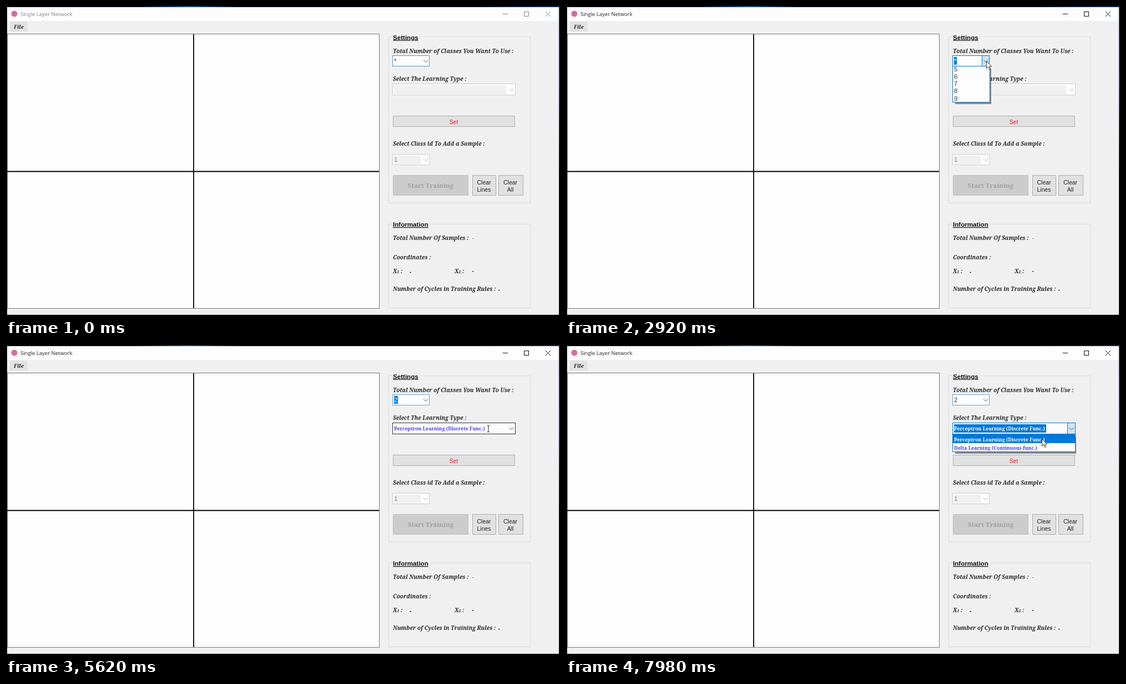
Write an HTML page that moves like this. It is 998 px wide and 561 px high and loops after 8 s.

```html
<!DOCTYPE html>
<html lang="en">
<head>
<meta charset="utf-8">
<title>Single Layer Network</title>
<style>
  html, body { margin: 0; width: 100%; height: 100%; overflow: hidden; background: #f0f0f0; }
  svg { display: block; }
  rect, .crisp { shape-rendering: crispEdges; }
  text { white-space: pre; }
  .label { font: italic bold 10px "Noto Serif", serif; fill: #262626; }
  .heading { font: bold 11.6px "Liberation Sans", sans-serif; fill: #111; text-decoration: underline; }
  .sans { font: 10.4px "Liberation Sans", sans-serif; fill: #222; }
  .value { font: 11.4px "Liberation Sans", sans-serif; fill: #333; }
  .dash { font: bold 10px "Liberation Sans", sans-serif; fill: #222; }
  .choice { font: bold 8.7px "Noto Serif", serif; fill: #463ee0; }
  .mid { text-anchor: middle; }
  .box { fill: #fdfdfd; stroke: #cccccc; }
  .inner { fill: #f0f0f0; }
  .button { fill: #e1e1e1; stroke: #adadad; }
  .group { fill: none; stroke: #dcdcdc; }
  .blue { fill: #0078d7; }
  .list { fill: #fdfdfd; stroke: #0078d7; }
  .shadow { fill: #555; opacity: .65; }
  .chevron { fill: none; stroke: #555; }
  .off { stroke: #b0b0b0; }
  .light { fill: #fff; }
</style>
</head>
<body>
<svg id="stage" width="998" height="561" viewBox="0 0 998 561">
  <defs>
    <linearGradient id="desktop">
      <stop offset=".24" stop-color="#030811"/><stop offset=".33" stop-color="#0c4a94"/>
      <stop offset=".42" stop-color="#030811"/><stop offset=".85" stop-color="#030811"/>
      <stop offset="1" stop-color="#0a2a58"/>
    </linearGradient>
    <linearGradient id="edge" x2="0" y2="1">
      <stop offset="0" stop-color="#0a2a58"/><stop offset=".25" stop-color="#0c3c7c"/>
      <stop offset=".55" stop-color="#050d1c"/>
    </linearGradient>
    <path id="chevron" d="M-4-2L0 2L4-2"/>
  </defs>

  <!-- Window frame -->
  <rect width="998" height="561" fill="#f0f0f0"/>
  <rect y="2" width="996" height="25" fill="#fdfdfd"/>
  <rect width="998" height="2" fill="url(#desktop)"/>
  <rect x="996" width="2" height="561" fill="url(#edge)"/>
  <rect y="557" width="998" height="4" fill="#000"/>
  <rect width="2" height="561" fill="#000"/>
  <circle cx="15" cy="14" r="5.5" fill="#cf6f9f"/>
  <text id="title" x="26" y="18" style="font:9.5px 'Open Sans',sans-serif">Single Layer Network</text>
  <g id="controls" fill="none">
    <path class="crisp" d="M895 14.5H904M933.5 10.5H941.5V18.5H933.5Z"/>
    <path d="M972 10L981 19M981 10L972 19"/>
  </g>
  <rect x="7" y="28" width="32" height="18" fill="#e2e2e2"/>
  <text class="label" x="14" y="40.5" style="font-size:9.6px">File</text>

  <!-- Plot area -->
  <rect x="2.5" y="50.5" width="670" height="495" fill="#fdfdfd" stroke="#777780"/>
  <path d="M338 51V545M2 298.5H672" stroke="#000" stroke-width="1.8"/>

  <!-- Settings -->
  <path class="group crisp" d="M695 55.5H689.5V355.5H944.5V55.5H746"/>
  <text class="heading" x="697" y="60.5">Settings</text>
  <text class="label" x="697" y="84.5">Total Number of Classes You Want To Use :</text>
  <rect id="classBox" class="box" x="696.5" y="89.5" width="66" height="19"/>
  <rect id="classButton" x="749.5" y="89.5" width="13" height="19"/>
  <rect id="classMark" class="blue" x="699" y="92" height="14"/>
  <text id="classValue" class="value" x="699" y="103"></text>
  <use href="#chevron" class="chevron" x="756" y="99.5"/>

  <text class="label" x="697" y="135">Select The Learning Type :</text>
  <rect id="typeBox" class="box" x="696.5" y="140.5" width="221" height="20"/>
  <rect id="typeInner" class="inner" x="699" y="143" width="202" height="16"/>
  <rect id="typeButton" x="903.5" y="140.5" width="14" height="20"/>
  <rect id="typeMark" class="blue" x="699" y="143" width="166" height="15"/>
  <text id="typeValue" class="choice" x="699" y="154">Perceptron Learning (Discrete Func.)</text>
  <use id="typeChevron" href="#chevron" x="910.5" y="151"/>

  <rect class="button" x="697.5" y="198.5" width="219" height="19"/>
  <text class="sans mid" x="806.5" y="212.5" style="fill:#ee1430">Set</text>

  <text class="label" x="697" y="251.5">Select Class id To Add a Sample :</text>
  <rect class="box" x="696.5" y="267.5" width="66" height="19"/>
  <rect class="inner" x="699" y="270" width="48" height="15"/>
  <text class="value" x="699" y="281" style="fill:#858585">1</text>
  <use href="#chevron" class="chevron off" x="756" y="277.5"/>

  <rect x="697.5" y="305.5" width="135" height="36" fill="#cccccc" stroke="#bfbfbf"/>
  <text class="mid" x="765" y="328" style="font:bold 11.6px 'Noto Serif',serif;fill:#a0a0a0">Start Training</text>
  <rect class="button" x="840.5" y="305.5" width="42" height="36"/>
  <rect class="button" x="887.5" y="305.5" width="44" height="36"/>
  <g class="sans mid">
    <text x="861" y="322">Clear</text><text x="861" y="334.5">Lines</text>
    <text x="908.5" y="322">Clear</text><text x="908.5" y="334.5">All</text>
  </g>

  <!-- Information -->
  <path class="group crisp" d="M695 393.5H689.5V544.5H944.5V393.5H762"/>
  <text class="heading" x="697" y="398">Information</text>
  <g class="label">
    <text x="697" y="422">Total Number Of Samples :</text>
    <text x="697" y="456.5">Coordinates :</text>
    <text x="697" y="481.5">X<tspan font-size="7.4">1</tspan> :</text>
    <text x="808" y="481.5">X<tspan font-size="7.4">2</tspan> :</text>
    <text x="697" y="514">Number of Cycles in Training Rules :</text>
  </g>
  <g class="dash">
    <text x="839.5" y="422" style="font-weight:normal;fill:#777">-</text>
    <text x="727" y="482.5">-</text>
    <text x="839.5" y="480.5">-</text>
    <text x="886.5" y="515">-</text>
  </g>

  <!-- Drop-down lists -->
  <g id="classList">
    <rect class="shadow" x="701" y="113" width="65"/>
    <svg x="696" y="109" width="69"><g>
      <rect class="list" x=".5" y=".5" width="67" height="107"/>
      <rect class="blue" x="1" y="1" width="66" height="13"/>
      <g id="digits" class="value"></g>
    </g></svg>
  </g>
  <g id="typeList">
    <rect class="shadow" x="701" y="165" width="218"/>
    <svg x="696" y="161" width="223"><g>
      <rect id="typeFrame" class="list" x=".5" y=".5" width="221" height="31"/>
      <rect class="blue" x="1" y="1" width="220" height="15"/>
      <text class="choice light" x="3" y="12.5" style="fill:#fff">Perceptron Learning (Discrete Func.)</text>
      <text class="choice" x="3" y="27.5">Delta Learning (Continuous func.)</text>
    </g></svg>
  </g>

  <g id="pointer">
    <path id="arrow" d="M.5.5V13.5L3.5 10.7L5.6 15.5L7.7 14.6L5.6 10H9.6Z" fill="#fff" stroke="#222" stroke-width=".9"/>
    <path id="beam" d="M-2.5-6H-.5L0-5.5L.5-6H2.5M0-5.5V5.5M-2.5 6H-.5L0 5.5L.5 6H2.5" fill="none" stroke="#222"/>
  </g>
</svg>
<script>
const LOOP = 8000;
const OPEN_CLASSES = 2800, PICK_CLASS = 4300, OPEN_TYPES = 6740, SLIDE = 200;
const path = [ // time, x, y
  [500, 772, 92], [760, 791, 81], [1400, 791, 81], [2150, 762, 94],
  [2500, 757, 98], [3100, 757, 99], [3700, 751, 114], [4350, 751, 114],
  [4950, 835, 150], [5450, 869, 151], [5900, 869, 151], [6500, 908, 153],
  [7000, 908, 153], [7700, 857, 169], [LOOP, 857, 169]
];

const $ = id => document.getElementById(id);
const set = (id, attrs) => {
  for (const name in attrs) $(id).setAttribute(name, attrs[name]);
};
const paint = (id, fill, stroke = 'none') => Object.assign($(id).style, { fill, stroke });
const show = (id, visible) => $(id).style.display = visible ? '' : 'none';
const clamp = v => Math.max(0, Math.min(1, v));

$('digits').innerHTML = [2, 3, 4, 5, 6, 7, 8, 9].map((n, i) =>
  `<text x="3" y="${11.5 + i * 13.25}"${i ? '' : ' class="light"'}>${n}</text>`).join('');

function pointerAt(t) {
  const i = Math.max(1, path.findIndex(p => p[0] >= t));
  const [t0, x0, y0] = path[i - 1], [t1, x1, y1] = path[i];
  const k = clamp((t - t0) / (t1 - t0)), ease = k * k * (3 - 2 * k);
  return [x0 + (x1 - x0) * ease, y0 + (y1 - y0) * ease];
}

// The list slides out from under its box, bottom edge first.
function slideList(id, progress, height) {
  show(id, progress > 0);
  const visible = height * progress;
  const view = $(id).querySelector('svg');
  view.setAttribute('height', visible);
  view.firstElementChild.setAttribute('transform', `translate(0 ${visible - height})`);
  $(id).querySelector('.shadow').setAttribute('height', Math.max(0, visible - 1));
}

function draw(t) {
  const active = t >= OPEN_CLASSES, picked = t >= PICK_CLASS, typesOpen = t >= OPEN_TYPES;
  const classesOpen = active && !picked, settled = t >= OPEN_TYPES + SLIDE;
  const [x, y] = pointerAt(t);
  const inside = (l, top, r, b) => x >= l && x <= r && y >= top && y <= b;
  const overClass = inside(697, 90, 763, 108), overType = inside(697, 140, 917, 161);

  $('title').style.fill = active ? '#222' : '#858585';
  $('controls').style.stroke = active ? '#111' : '#858585';

  const classBorder = picked ? '#6f9fd0' : active ? '#0078d7' : t < 760 ? '#5b93bd' : overClass ? '#333' : '#777';
  paint('classBox', '#fdfdfd', classBorder);
  paint('classButton', classesOpen ? '#cce4f7' : 'none', classesOpen ? '#0078d7' : 'none');
  const marked = active && !typesOpen;
  show('classMark', marked);
  set('classMark', { width: picked ? 7 : 5 });
  $('classValue').textContent = picked ? '2' : '*';
  $('classValue').style.fill = marked ? '#fff' : '#333';

  const typeBorder = !picked ? '#cccccc' : settled ? '#0078d7' : overType ? '#333' : '#777';
  paint('typeBox', '#fdfdfd', typeBorder);
  $('typeFrame').style.stroke = typeBorder;
  show('typeInner', !picked);
  show('typeValue', picked);
  $('typeValue').style.fill = typesOpen ? '#fff' : '#463ee0';
  show('typeMark', typesOpen);
  paint('typeButton', settled ? '#cce4f7' : typesOpen ? '#e5f1fb' : 'none',
    settled ? '#0078d7' : typesOpen ? '#a9cdec' : 'none');
  $('typeChevron').setAttribute('class', picked ? 'chevron' : 'chevron off');

  slideList('classList', classesOpen ? clamp((t - OPEN_CLASSES) / SLIDE) : 0, 108);
  slideList('typeList', clamp((t - OPEN_TYPES) / SLIDE), 32);

  show('pointer', t >= path[0][0]);
  set('pointer', { transform: `translate(${Math.round(x)} ${Math.round(y)})` });
  const beam = overClass && x < 749 || picked && overType && x < 903 && !typesOpen;
  show('beam', beam);
  show('arrow', !beam);
}

function frame() {
  draw(performance.now() % LOOP);
  requestAnimationFrame(frame);
}
frame();
</script>
</body>
</html>
```
